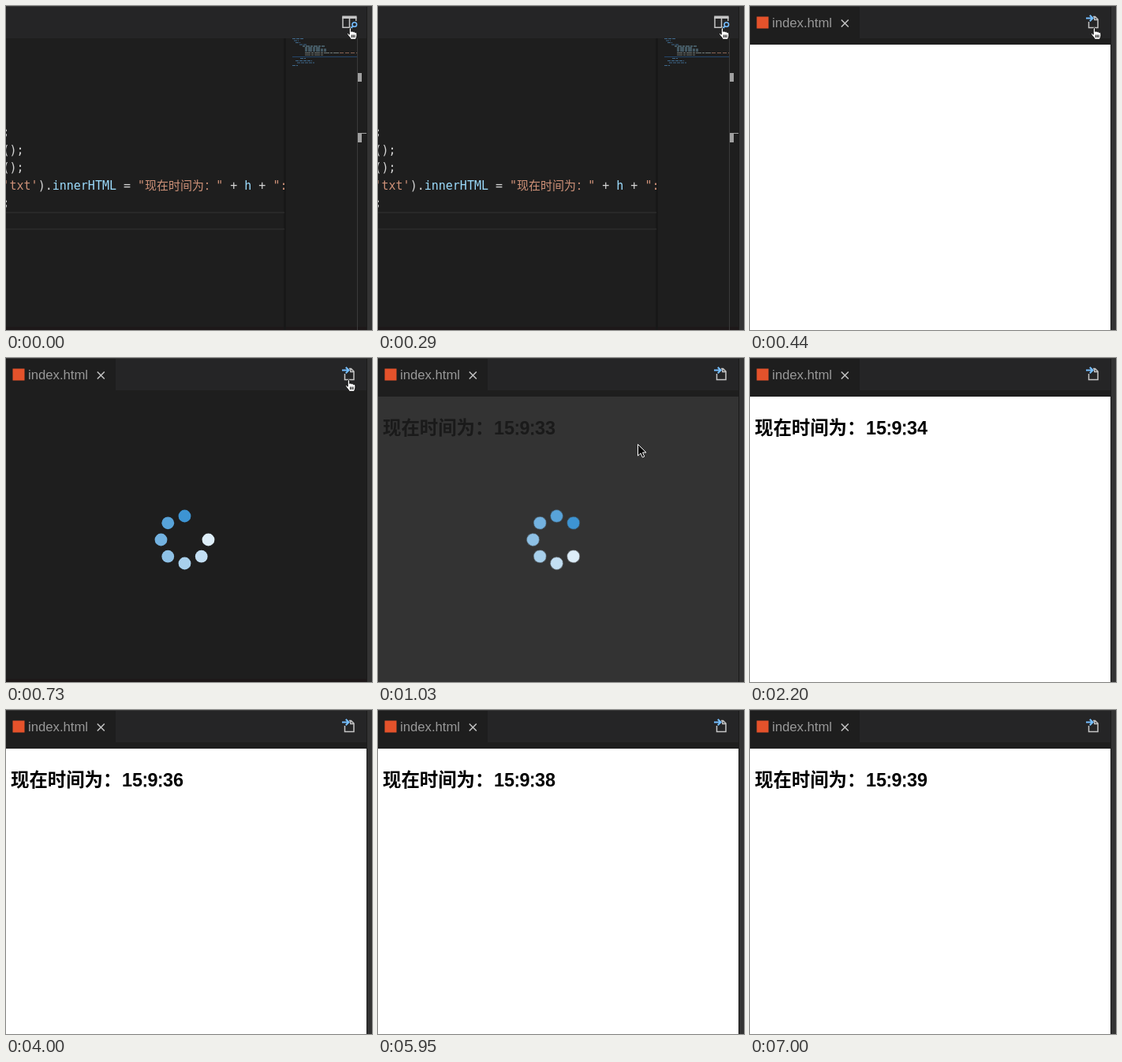
An HTML page that plays this animation: 464x411 px, repeating every 8 s.

```html
<!DOCTYPE html>
<html lang="zh-CN">
<head>
<meta charset="utf-8">
<title>Page preview</title>
<style>
html, body { margin: 0; width: 100%; height: 100%; overflow: hidden; background: #1e1e1e; }
svg { display: block; width: 464px; height: 411px; }
text { white-space: pre; }

.code { font: 15px "DejaVu Sans Mono", "Noto Sans CJK SC", monospace; fill: #d4d4d4; }
.str { fill: #ce9178; }
.var { fill: #9cdcfe; }
.name { font: 16.7px "Liberation Sans", Arial, sans-serif; fill: #989898; }
.title { font: bold 23.4px "Noto Sans CJK SC", sans-serif; }
.num { font: bold 23.4px "Liberation Sans", Arial, sans-serif; }
.colon { font-weight: 400; stroke: currentColor; stroke-width: .8px; }
.line { fill: none; stroke: #c5c5c5; stroke-width: 1.5; }
.map { fill: none; stroke-width: 1; opacity: .6; }

.anim { animation: 8s step-end infinite; }
#editor { animation-name: editor; }
#preview { animation-name: preview; }
#sheet { animation-name: sheet; }
#clock { animation-name: clock; }
#digit { animation-name: digit; }
#spinner { animation-name: spinner; }
#wheel { animation-name: wheel; transform-origin: 226.5px 230.5px; }
#hand { animation-name: hand; }
#arrow { animation-name: arrow; }

@keyframes editor { 0% { opacity: 1 } 5.5%, 100% { opacity: 0 } }
@keyframes preview { 0% { opacity: 0 } 5.5%, 100% { opacity: 1 } }
@keyframes sheet {
  0% { fill: #fff; opacity: 1 }
  9.125% { fill: #1e201f; opacity: 0 }
  12.875% { fill: #333; opacity: 1 }
  14.625%, 100% { fill: #fff; opacity: 1 }
}
@keyframes clock {
  0% { opacity: 0; fill: #1a1a1a; color: #1a1a1a }
  12.875% { opacity: 1; fill: #1a1a1a; color: #1a1a1a }
  14.625%, 100% { opacity: 1; fill: #000; color: #000 }
}
@keyframes digit {
  0% { transform: translateY(0) }
  23.875% { transform: translateY(-40px) }
  36.875% { transform: translateY(-80px) }
  50% { transform: translateY(-120px) }
  61.25% { transform: translateY(-160px) }
  74.375% { transform: translateY(-200px) }
  87.5%, 100% { transform: translateY(-240px) }
}
@keyframes spinner { 0% { opacity: 0 } 9.125% { opacity: 1 } 14.625%, 100% { opacity: 0 } }
@keyframes wheel { 0% { transform: rotate(0deg) } 12.875%, 100% { transform: rotate(45deg) } }
@keyframes hand {
  0% { opacity: 1; transform: translate(432px, 27px) }
  9.125% { opacity: 1; transform: translate(430px, 27px) }
  11%, 100% { opacity: 0; transform: translate(430px, 27px) }
}
@keyframes arrow {
  0% { opacity: 0; transform: translate(355px, 73px) }
  11% { opacity: 1; transform: translate(355px, 73px) }
  12.875% { opacity: 1; transform: translate(329px, 109px) }
  16.5% { opacity: 1; transform: translate(273px, 183px) }
  18.375% { opacity: 1; transform: translate(250px, 201px) }
  20.25% { opacity: 1; transform: translate(254px, 202px) }
  22% { opacity: 1; transform: translate(280px, 251px) }
  25.75% { opacity: 1; transform: translate(394px, 240px) }
  27.5%, 100% { opacity: 0; transform: translate(394px, 240px) }
}
</style>
</head>
<body>
<svg viewBox="0 0 464 411">
  <defs>
    <clipPath id="codeArea"><path d="M0 41H355V411H0Z"/></clipPath>
    <clipPath id="digitArea"><path d="M208 76H230V102H208Z"/></clipPath>
  </defs>

  <path fill="#1e1e1e" d="M0 0H464V411H0Z"/>
  <path fill="#252526" d="M0 0H458V41H0Z"/>
  <path fill="#1d1819" d="M0 407H458V411H0Z"/>

  <g id="editor" class="anim">
    <path fill="#181818" d="M352 41H355V411H352Z"/>
    <path stroke="#2d2d2d" stroke-width="1.5" d="M0 262H353M0 283H353"/>
    <g class="code" clip-path="url(#codeArea)">
      <text x="-4.5" y="165">;</text>
      <text x="-4.5" y="187.5">();</text>
      <text x="-4.5" y="210">();</text>
      <text x="-4.5" y="232.5"><tspan class="str">'txt'</tspan>).<tspan class="var">innerHTML</tspan> = <tspan class="str">"现在时间为："</tspan> + <tspan class="var">h</tspan> + <tspan class="str">":</tspan></text>
      <text x="-4.5" y="255">;</text>
    </g>

    <g class="map">
      <path stroke="#569cd6" stroke-dasharray="4 1" d="M363 41.5H378M365 44H371M367 46.5H373M372 49H381M373 66.5H380M367 69.5H388M369 72H391M363 75.5H370"/>
      <path stroke="#9cdcfe" stroke-dasharray="3 1 5 1" d="M376 51H404M379 53H398M379 55H406M379 57H406"/>
      <path stroke="#a9b8b4" stroke-dasharray="7 1 3 1" d="M379 59.5H423M379 62H403"/>
      <path stroke="#ce9178" stroke-dasharray="5 2" d="M423 59.5H445"/>
    </g>
    <path stroke="#24466b" d="M363 64.5H445"/>
    <path stroke="#3a3a3a" d="M445.5 41V411"/>
    <path fill="#a0a0a0" d="M446 85H451V96H446ZM446 161H457V162H451V173H446Z"/>

    <path class="line" d="M427 14V27.2H438M443.8 14V19M435.5 15V27"/>
    <path fill="#c5c5c5" d="M426.2 12.5H444.6V16H426.2Z"/>
    <circle cx="441.8" cy="23.5" r="2.8" fill="none" stroke="#75beff" stroke-width="1.6"/>
    <path stroke="#75beff" stroke-width="1.8" d="M439.8 25.6L436.8 28.8"/>
  </g>

  <g id="preview" class="anim">
    <path fill="#1e1e1e" d="M0 1H139V41H0Z"/>
    <rect x="8.5" y="13.5" width="15" height="15" fill="#e4522b"/>
    <text class="name" x="28" y="27">index.html</text>
    <path class="line" d="M115.8 17.5L124.8 26.5M124.8 17.5L115.8 26.5"/>
    <path class="line" d="M429.5 20V27.5H441V17L437.5 13.5H435M436.8 13.8V17.5H441"/>
    <path fill="none" stroke="#75beff" stroke-width="2" d="M426 15.5H434M430.8 11.7L434.6 15.5L430.8 19.3"/>
    <path id="sheet" class="anim" d="M0 49H457V411H0Z"/>
    <g id="clock" class="anim">
      <text class="title" x="6" y="97">现在时间为：</text>
      <text class="num" x="147" y="97">15<tspan class="colon">:</tspan>9<tspan class="colon">:</tspan>3</text>
      <g clip-path="url(#digitArea)">
        <g id="digit" class="anim num"></g>
      </g>
    </g>
    <g id="spinner" class="anim"><g id="wheel" class="anim"></g></g>
  </g>

  <path fill="#3a3a3a" d="M0 0H464V1H0Z"/>
  <path fill="#1b1b1b" d="M457 1H458V411H457Z"/>
  <path fill="#333" d="M458 1H464V411H458Z"/>

  <g id="hand" class="anim" stroke="#111" stroke-linejoin="round">
    <path fill="#fff" d="M3.2 9.2V2C3.2 .2 5.7 .2 5.7 2V5.5C6.5 4.5 8 4.8 8.2 6C9 5.2 10.3 5.5 10.5 6.7C11.4 6 12.9 6.5 12.9 8V11C12.9 12.8 11.7 13.5 11.5 15.3H5C4.7 13 2.2 11.5 .8 9C.1 7.6 1.8 7 2.5 8.2Z"/>
    <path fill="none" d="M6.5 9.5V13M8.3 9.5V13M10.1 9.5V13"/>
  </g>
  <path id="arrow" class="anim" fill="#000" stroke="#fff" d="M.5 .5V15L4 11.8L6.3 17L8.7 16L6.5 10.9H11Z"/>
</svg>
<script>
const add = (parent, tag, attrs, text = "") => {
  const el = document.createElementNS("http://www.w3.org/2000/svg", tag);
  for (const key in attrs) el.setAttribute(key, attrs[key]);
  el.textContent = text;
  document.getElementById(parent).append(el);
};

// Last digit of the clock: a strip that moves up one step per second
for (let i = 0; i < 7; i++) add("digit", "text", { x: 212.1, y: 97 + 40 * i }, 3 + i);

// Seven of eight dots, fading anticlockwise from the top
const dark = [61, 148, 211], light = [222, 238, 249];
for (let i = 0; i < 7; i++) {
  const angle = -Math.PI / 2 - i * Math.PI / 4;
  const rgb = dark.map((c, k) => Math.round(c + (light[k] - c) * i / 6));
  add("wheel", "circle", {
    cx: 226.5 + 30 * Math.cos(angle),
    cy: 230.5 + 30 * Math.sin(angle),
    r: 7.9,
    fill: `rgb(${rgb})`
  });
}
</script>
</body>
</html>
```
